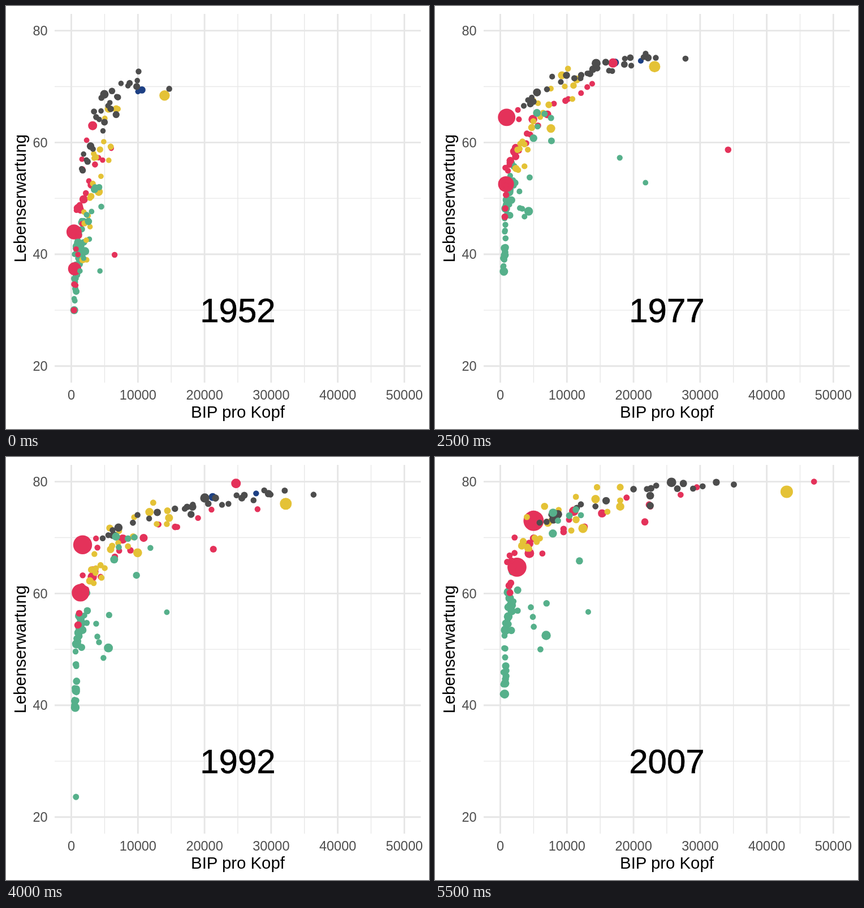
An HTML page for the animation above (6 s loop, 748 by 748 pixels).

```html
<!DOCTYPE html>
<html lang="de">
<head>
<meta charset="utf-8">
<title>Lebenserwartung und BIP</title>
<style>
html, body { margin: 0; width: 100%; height: 100%; overflow: hidden; background: #fff; }
svg { display: block; width: 100%; height: 100%; }
text { font-family: "Liberation Sans", Arial, sans-serif; }
.tick { font-size: 23.47px; fill: #4d4d4d; }
.title { font-size: 29.33px; text-anchor: middle; }
.year { font-size: 60px; text-anchor: middle; stroke: #000; stroke-width: .6; }
.major { stroke: #e6e6e6; stroke-width: 2.85; }
.minor { stroke: #e8e8e8; stroke-width: 1.42; }
</style>
</head>
<body>
<svg id="stage" viewBox="0 0 748 748"></svg>
<script>
const STEP = 500, STEPS = 12, LAST = STEPS - 1;
const GREEN = '#56b08b', RED = '#e4325a', YELLOW = '#e4c236', GREY = '#4d4d4d', BLUE = '#1d4084';

// Dots with a path of their own: radius from/to, then points [step, income in hundreds, life].
const leads = [
  { fill: YELLOW, r: [9.2, 11], path: [[0, 140, 68.4], [6, 250, 74.6], [11, 430, 78.2]] },
  { fill: RED, r: [13.3, 18], path: [[0, 4, 44], [2, 5, 44.5], [4, 7, 63.1], [8, 17, 68.7], [11, 50, 73]] },
  { fill: RED, r: [11.7, 16.9], path: [[0, 5, 37.4], [7, 10, 58.6], [11, 25, 64.7]] },
  { fill: RED, r: [8, 8.7], path: [[0, 32, 63], [7, 224, 78.7], [11, 317, 82.6]] },
  { fill: RED, r: [4.9, 5.3], path: [[0, 23, 60.4], [6, 152, 71.8], [11, 471, 80]] },
  { fill: RED, r: [5.2, 6.4], path: [[0, 65, 39.9], [5, 342, 58.7], [6, 337, 63], [7, 212, 66.3], [11, 217, 72.8]] },
  { fill: GREY, r: [5.3, 5.5], path: [[0, 147, 69.6], [4, 272, 73.8], [6, 284, 76.2], [11, 375, 81.7]] },
  { fill: GREY, r: [5.2, 5.3], path: [[0, 101, 72.7], [4, 190, 74.3], [11, 494, 80.2]] },
  { fill: GREEN, r: [4.9, 5.4], path: [[0, 27, 42.7], [4, 210, 52.8], [7, 118, 66.2], [11, 121, 74]] },
  { fill: GREEN, r: [4.8, 5], path: [[0, 43, 37], [4, 114, 48.7], [5, 218, 52.8], [6, 151, 56.6], [11, 132, 56.7]] },
  { fill: GREEN, r: [5.1, 5.7], path: [[0, 5, 40], [7, 9, 44], [8, 7, 23.6], [11, 9, 46.2]] }
];

// Clouds of n dots: income and life ranges at both ends of the loop,
// with the exponents that bend their course in time.
const clouds = [
  { fill: BLUE, n: 2, income: [[100, 106], [344, 252]], life: [[69.1, 69.4], [81.2, 80.2]], bend: [1, 1] },
  { fill: GREEN, n: 37, income: [[4, 19], [4, 26]], life: [[30, 46], [42, 64]], bend: [1, .7] },
  { fill: RED, n: 16, income: [[4, 17], [9, 70]], life: [[30, 57], [60, 74]], bend: [1.5, .8] },
  { fill: RED, n: 11, income: [[11, 60], [95, 295]], life: [[44, 63], [71, 79]], bend: [1.4, .7] },
  { fill: YELLOW, n: 24, income: [[17, 70], [30, 180]], life: [[39, 66], [68, 79]], bend: [1.1, .75] },
  { fill: GREY, n: 12, income: [[15, 68], [59, 225]], life: [[55, 66], [72.5, 77.5]], bend: [1, .55] },
  { fill: GREY, n: 16, income: [[34, 104], [200, 405]], life: [[64.5, 72], [78.3, 80.9]], bend: [1, .9] },
  { fill: GREEN, n: 12, income: [[13, 47], [40, 124]], life: [[37, 52], [50, 75]], bend: [1, .65] }
];

let seed = 29;
const rnd = () => (seed = (seed * 16807) % 2147483647) / 2147483647;
const mix = (a, b, u) => a + (b - a) * u;
const clamp = u => Math.min(1, Math.max(0, u));

const stage = document.getElementById('stage');
const px = income => 115.5 + income * 1.1778;
const py = life => 43.6 + (80 - life) * 9.885;

function add(tag, attrs, text) {
  const el = document.createElementNS('http://www.w3.org/2000/svg', tag);
  for (const name in attrs) el.setAttribute(name, attrs[name]);
  if (text !== undefined) el.textContent = text;
  return stage.appendChild(el);
}

const vLine = (v, cls) => add('line', { class: cls, x1: px(v), x2: px(v), y1: 14, y2: 666 });
const hLine = (v, cls) => add('line', { class: cls, x1: 86, x2: 733.5, y1: py(v), y2: py(v) });

for (let v = 50; v < 500; v += 100) vLine(v, 'minor');
for (let v = 30; v < 80; v += 20) hLine(v, 'minor');
for (let v = 0; v <= 500; v += 100) {
  vLine(v, 'major');
  add('text', { class: 'tick', x: px(v), y: 696, 'text-anchor': 'middle' }, v * 100);
}
for (let v = 20; v <= 80; v += 20) {
  hLine(v, 'major');
  add('text', { class: 'tick', x: 73.5, y: py(v) + 8.4, 'text-anchor': 'end' }, v);
}
add('text', { class: 'title', x: 410, y: 728 }, 'BIP pro Kopf');
add('text', { class: 'title', transform: 'translate(35.2 340.3) rotate(-90)' }, 'Lebenserwartung');

function follow(path, k) {
  const i = Math.max(1, path.findIndex(p => p[0] >= k));
  const [a, b] = [path[i - 1], path[i]];
  const u = (k - a[0]) / (b[0] - a[0]);
  return [mix(a[1], b[1], u), mix(a[2], b[2], u)];
}

// Ranks drift a little between the two ends; richer dots tend to live longer.
function cloudDots({ fill, n, income, life, bend }) {
  return Array.from({ length: n }, (_, i) => {
    const rank = i / (n - 1);
    const near = spread => clamp(rank + (n > 2 ? (rnd() - .5) * spread : 0));
    const rich = ([lo, hi], u) => lo * (hi / lo) ** u;
    const ends = [
      [rich(income[0], near(.1)), mix(...life[0], near(.5))],
      [rich(income[1], near(.4)), mix(...life[1], near(.6))]
    ];
    const size = 4.8 + 3 * rnd() ** 3;
    return {
      fill, r: [size, size * 1.12],
      place: k => ends[0].map((v, j) => mix(v, ends[1][j], (k / LAST) ** bend[j]))
    };
  });
}

const leadDots = leads.map(d => ({ ...d, place: k => follow(d.path, k) }));
const [ocean, column, ...others] = clouds.map(cloudDots);
const dots = [ocean, column, leadDots, ...others].flat();
for (const dot of dots) dot.el = add('circle', { fill: dot.fill });
const year = add('text', { class: 'year', x: 410, y: 559 });

function show(k) {
  year.textContent = 1952 + 5 * k;
  for (const { el, r, place } of dots) {
    const [income, life] = place(k);
    el.setAttribute('cx', px(income));
    el.setAttribute('cy', py(life));
    el.setAttribute('r', mix(...r, k / LAST));
    el.setAttribute('visibility', life > 80.01 ? 'hidden' : 'visible');
  }
}

const start = performance.now();
let current = -1;
function tick() {
  const k = Math.floor((performance.now() - start) / STEP) % STEPS;
  if (k !== current) show(current = k);
  requestAnimationFrame(tick);
}
tick();
</script>
</body>
</html>
```
